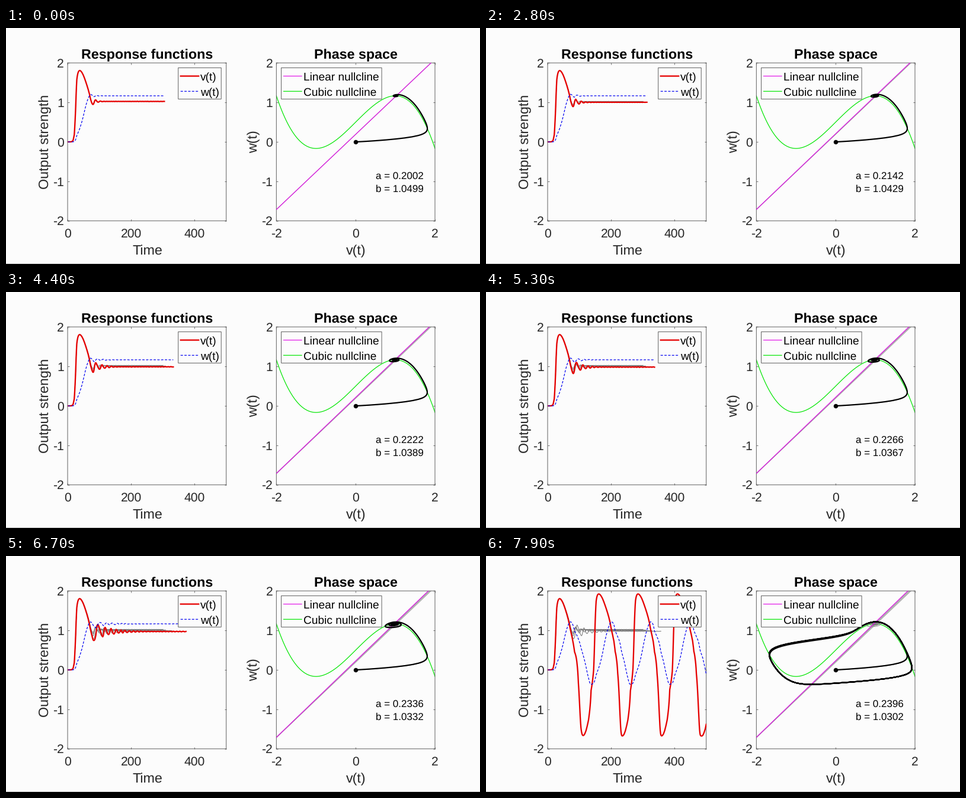
Write a matplotlib script that moves like this. It is 800 by 400 pixels and loops after 8000 ms.

```python
import numpy as np
import matplotlib.pyplot as plt
from matplotlib.animation import FuncAnimation
from matplotlib.patches import Rectangle

W, H, DPI = 800, 400, 100
FRAMES, INTERVAL = 80, 100
BACK, INK, EDGE = "#fcfcfc", "#262626", "#505050"
RED, BLUE, MAGENTA, GREEN = "#e60000", "#0000f0", "#e000e8", "#00e600"
DASH = (0, (3.3, 2.0))

plt.rcParams.update({
    "font.family": "Liberation Sans",
    "text.hinting": "none",
    "lines.scale_dashes": True,
    "path.simplify": False,
    "path.snap": False,
})


def pt(px):
    return px * 72 / DPI


# --- FitzHugh-Nagumo model, adaptive Dormand-Prince steps -------------------
DRIVE, EPS = 0.5, 0.1
RTOL, ATOL, REFINE = 1e-3, 1e-6, 4

STAGES = [np.array(row) for row in (
    [1/5],
    [3/40, 9/40],
    [44/45, -56/15, 32/9],
    [19372/6561, -25360/2187, 64448/6561, -212/729],
    [9017/3168, -355/33, 46732/5247, 49/176, -5103/18656],
    [35/384, 0, 500/1113, 125/192, -2187/6784, 11/84],
)]
ERROR = np.array([71/57600, 0, -71/16695, 71/1920, -17253/339200, 22/525, -1/40])
DENSE = np.array([
    [1, -183/64, 37/12, -145/128],
    [0, 0, 0, 0],
    [0, 1500/371, -1000/159, 1000/371],
    [0, -125/32, 125/12, -375/64],
    [0, 9477/3392, -729/106, 25515/6784],
    [0, -11/7, 11/3, -55/28],
    [0, 3/2, -4, 5/2],
])
INNER = [DENSE @ (j / REFINE) ** np.arange(1, 5) for j in range(1, REFINE)]


def params(index):
    a = 0.2 + 0.0002 * index
    return a, 1.15 - a / 2


def cubic(v):
    return v - v ** 3 / 3 + DRIVE


def solve(index, horizon):
    """Return all refined samples (v, w) of one run from rest."""
    a, b = params(index)

    def rhs(s):
        v, w = s
        return cubic(v) - w, EPS * (v + a - b * w)

    floor = ATOL / RTOL
    y, t, done = np.zeros(2), 0.0, False
    k = np.zeros((7, 2))
    k[0] = rhs(y)
    h = 0.8 * RTOL ** 0.2 / np.max(np.abs(k[0]) / floor)
    samples = [y]
    while not done:
        h = min(h, 0.1 * horizon)
        done = 1.1 * h >= horizon - t
        if done:
            h = horizon - t
        failed = False
        while True:
            for i, row in enumerate(STAGES, 1):
                new = y + h * (row @ k[:i])
                k[i] = rhs(new)
            scale = np.maximum(np.maximum(np.abs(y), np.abs(new)), floor)
            err = h * np.max(np.abs(ERROR @ k) / scale)
            if err <= RTOL:
                break
            h *= 0.5 if failed else max(0.1, 0.8 * (RTOL / err) ** 0.2)
            failed, done = True, False
        samples += [y + h * (c @ k) for c in INNER] + [new]
        t += h
        if not failed:
            h /= max(0.2, 1.25 * (err / RTOL) ** 0.2)
        y = new
        k[0] = k[6]
    return np.array(samples)


# The run length is the round time whose sample counts fit these lengths.
LENGTHS = {1: 305, 111: 333, 168: 373}


def misfit(horizon):
    gap = sum(abs(len(solve(m, horizon)) - n) for m, n in LENGTHS.items())
    return gap, horizon % 100


HORIZON = min(range(100, 561, 10), key=misfit)
WINDOW = 500
SWEEP = [1 + 5 * i // 2 for i in range(FRAMES)]
RUNS = [solve(m, HORIZON)[:WINDOW] for m in SWEEP]
KEPT = (0, 50, 100, 150)

# --- Stage ------------------------------------------------------------------
SIDE, MID_Y = 267.7, 193
fig = plt.figure(figsize=(W / DPI, H / DPI), dpi=DPI, facecolor=BACK)


def label(x, y, text, size, color=INK, **kw):
    return fig.text(x / W, 1 - y / H, text, fontsize=pt(size), color=color,
                    **{"va": "baseline", "ha": "center", **kw})


def panel(x, title, xlabel, ylabel, ylabel_x, xlim, xticks):
    top, mid = MID_Y - SIDE / 2, x + SIDE / 2
    ax = fig.add_axes([x / W, 1 - (top + SIDE) / H, SIDE / W, SIDE / H],
                      facecolor=BACK)
    ax.set(xlim=xlim, ylim=(-2, 2), xticks=xticks, yticks=range(-2, 3))
    ax.tick_params(direction="in", top=True, right=True, length=pt(3),
                   width=pt(0.8), color=EDGE,
                   labelbottom=False, labelleft=False)
    for spine in ax.spines.values():
        spine.set(linewidth=pt(0.9), color=EDGE, snap=False)
    for v in xticks:
        px = x + SIDE * (v - xlim[0]) / (xlim[1] - xlim[0])
        label(px, 354.8, str(v), 21.2)
    for v in range(-2, 3):
        label(x - 6, MID_Y - SIDE * v / 4 + 7.6, str(v), 21.2, ha="right")
    label(mid, 52.6, title, 23.3, "black", weight="bold")
    label(mid + 0.8, 384.2, xlabel, 23.3)
    label(ylabel_x, MID_Y, ylabel, 23.3, rotation=90, rotation_mode="anchor")
    return ax


def legend(x, width, entries):
    """Boxed key drawn above the panels, in stage pixels."""
    key.add_patch(Rectangle((x, 67.4), width, 53, facecolor=BACK, snap=False,
                            edgecolor=EDGE, linewidth=pt(0.9)))
    for y, (text, style) in zip((81.5, 107.3), entries):
        key.plot([x + 4, x + 34.5], [y, y], **style)
        key.text(x + 37.6, y + 7.3, text, fontsize=pt(19.2), color="black",
                 va="baseline", ha="left")


V_STYLE = dict(color=RED, lw=pt(2.3))
W_STYLE = dict(color=BLUE, lw=pt(1.2), ls=DASH, dash_capstyle="butt")
LINE_STYLE = dict(color=MAGENTA, lw=pt(1.1))
CUBIC_STYLE = dict(color=GREEN, lw=pt(1.2))

left = panel(104, "Response functions", "Time", "Output strength", 71.8,
             (0, WINDOW), (0, 200, 400))
right = panel(456.3, "Phase space", "v(t)", "w(t)", 424,
              (-2, 2), (-2, 0, 2))

key = fig.add_axes([0, 0, 1, 1], zorder=5)
key.set(xlim=(0, W), ylim=(H, 0))
key.axis("off")
key.add_patch(Rectangle((0, 399), W, 1, facecolor="#bcbcbc", linewidth=0))
legend(290.7, 72.5, [("v(t)", V_STYLE), ("w(t)", W_STYLE)])
legend(464.6, 169.5, [("Linear nullcline", LINE_STYLE),
                      ("Cubic nullcline", CUBIC_STYLE)])

ends = np.array([-2.0, 2.0])
grid = np.linspace(-2, 2, 201)


def nullcline(index):
    a, b = params(index)
    return (ends + a) / b


def count(samples):
    return np.arange(1, len(samples) + 1)


# Thin grey traces of earlier runs stay visible once the sweep has passed them.
ghosts = []
for m in KEPT:
    run = solve(m, HORIZON)
    ghosts.append((m, [
        left.plot(count(run), run[:, 0], color="#757575", lw=pt(1), zorder=2)[0],
        right.plot(ends, nullcline(m), color="#b0b0b0", lw=pt(1.2), zorder=2)[0],
        right.plot(*run.T, color="#808080", lw=pt(0.9), zorder=2.2)[0],
    ]))

right.plot(grid, cubic(grid), zorder=2.1, **CUBIC_STYLE)
v_line, = left.plot([], [], zorder=3, **V_STYLE)
w_line, = left.plot([], [], zorder=3.1, **W_STYLE)
linear, = right.plot([], [], zorder=3, **LINE_STYLE)
orbit, = right.plot([], [], color="black", lw=pt(2.2), zorder=4)
right.plot([0], [0], "o", color="black", ms=pt(7.5), mew=0, zorder=4)
a_text = label(623.7, 256.6, "", 17, "black", ha="left")
b_text = label(623.7, 277.4, "", 17, "black", ha="left")


def draw(i):
    m, run = SWEEP[i], RUNS[i]
    a, b = params(m)
    v_line.set_data(count(run), run[:, 0])
    w_line.set_data(count(run), run[:, 1])
    orbit.set_data(*run.T)
    linear.set_data(ends, nullcline(m))
    a_text.set_text(f"a = {a:.4f}")
    b_text.set_text(f"b = {b:.4f}")
    for start, lines in ghosts:
        for line in lines:
            line.set_visible(m > start)


animation = FuncAnimation(fig, draw, frames=FRAMES, interval=INTERVAL,
                          init_func=lambda: draw(0), repeat=True,
                          repeat_delay=0, blit=False)
plt.show()
```
